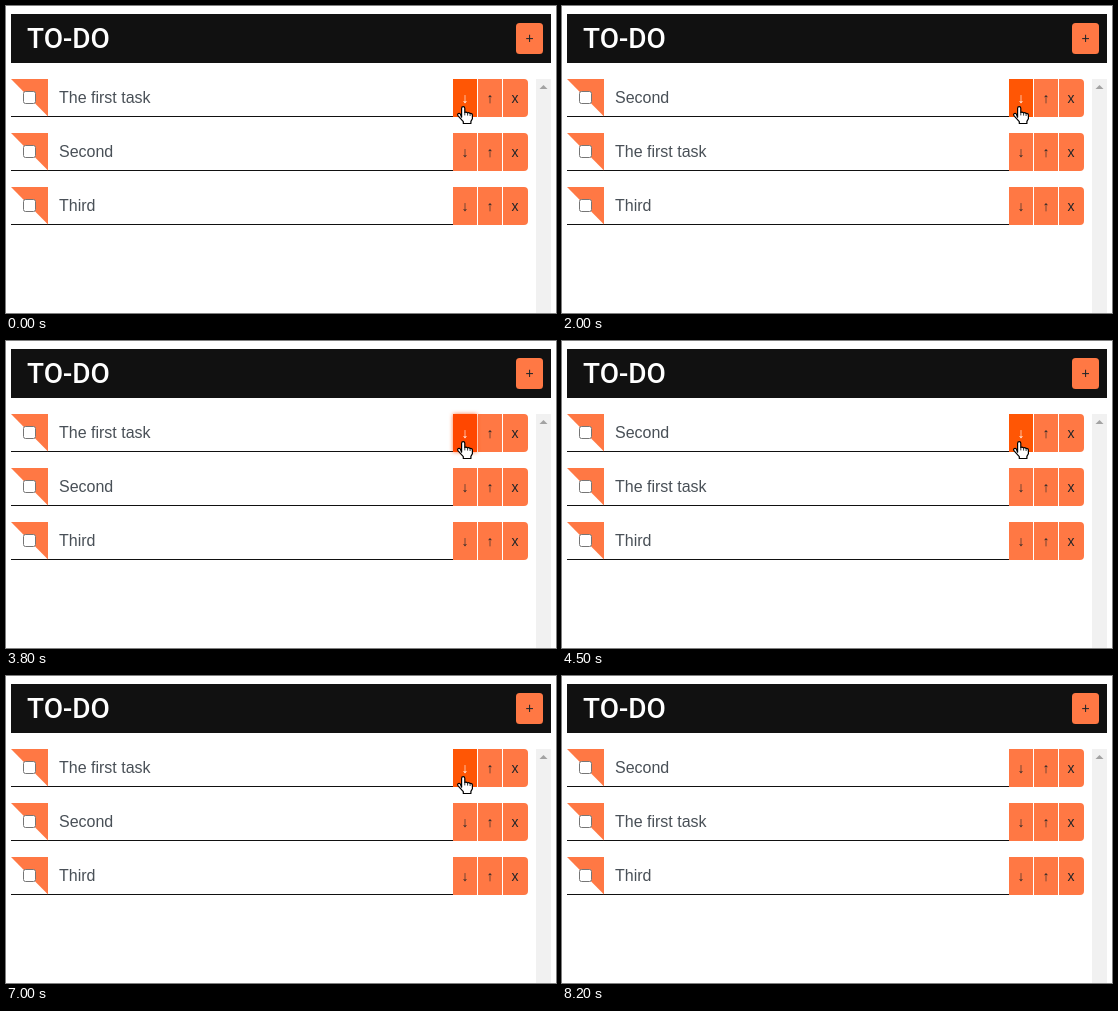
Write an HTML page that moves like this. It is 550 px wide and 307 px high and loops after 9100 ms.

```html
<!DOCTYPE html>
<html lang="en">
<head>
<meta charset="utf-8">
<title>To-do list</title>
<style>
  html, body { margin: 0; width: 100%; height: 100%; overflow: hidden; background: #fff; }
  svg { display: block; width: 550px; height: 307px; font: 14px "Liberation Sans", Arial, sans-serif; }
  .title { font: 500 28px Roboto, sans-serif; fill: #fff; }
  .task { font-size: 16px; fill: #495057; }
  .label { text-anchor: middle; fill: #212529; }
  .accent { fill: #ff7844; }
  .cursor { fill: #fff; stroke: #000; stroke-width: 1.2; stroke-linejoin: round; }
  .glow { filter: drop-shadow(0 0 2px rgba(255, 71, 0, .75)); }
</style>
</head>
<body>
<svg viewBox="0 0 550 307">
  <rect x="5" y="8" width="540" height="49" fill="#111"/>
  <text class="title" x="21" y="42">TO-DO</text>
  <rect class="accent" x="510" y="17" width="27" height="31" rx="3.5"/>
  <text class="label" x="523.5" y="37">+</text>
  <rect x="530" y="73" width="15" height="234" fill="#f1f1f1"/>
  <path d="M533.5 83h8l-4-4z" fill="#a3a3a3"/>
  <g id="rows"></g>
  <g id="hot">
    <rect id="hotButton" x="447" y="73" width="24" height="38"/>
    <text id="hotLabel" class="label" x="459" y="97">↓</text>
  </g>
  <g id="hand" class="cursor">
    <path d="M455.6 111.2V102.2q0-1.6 1.6-1.6t1.6 1.6v4.2q1.4-.9 2.7.4q1.5-.6 2.5.6
             q2.4-.3 2.4 2v3.4l-1.5 2.6v2.1h-7.6v-1.8l-5.4-6q-.8-1.4.4-2.2q1.2-.5 2 .5z"/>
    <path d="M458.8 106.4v3M461.6 107v2.6M464.1 107.6v2.4" fill="none" stroke-width=".8"/>
  </g>
  <path id="arrow" class="cursor" d="M455.5 101.7v16.2l3.7-3.5l2.5 5.9l2.7-1.1l-2.5-5.8h5.1z"/>
</svg>
<script>
const LOOP = 9100, STEP = 100;
const LEAVE = 8000;
// Each swap: button glows, rows return in the other order, hover colour is complete.
const swaps = [
  [700, 1300, 1400],
  [2100, 2700, 2900],
  [3800, 4400, 4500],
  [5500, 6100, 6100],
  [7100, 7600, 7800],
];
const NORMAL = [255, 120, 68], HOVER = [255, 86, 5], ACTIVE = [255, 71, 0];
const INK = [33, 37, 41], WHITE = [255, 255, 255];

const $ = id => document.getElementById(id);
const show = (element, on) => element.setAttribute('visibility', on ? 'visible' : 'hidden');
const mix = (a, b, k) => `rgb(${a.map((v, i) => Math.round(v + (b[i] - v) * k))})`;

const rowMarkup = (name, i) => `
  <g transform="translate(0 ${73 + i * 54})">
    <path d="M5 37h442v1H5z" fill="#111"/>
    <path class="accent" d="M5 0h37v37.5z"/>
    <rect x="17.5" y="12.5" width="12" height="12" rx="2" fill="#fff" stroke="#767676"/>
    <text class="task" x="53" y="24">${name}</text>
    <path class="accent" d="M447 0h24v38h-24zM472 0h24v38h-24zM497 0h21q4 0 4 4v30q0 4-4 4h-21z"/>
    <text class="label" x="459" y="24">↓</text>
    <text class="label" x="484" y="24">↑</text>
    <text class="label" x="509" y="24">x</text>
  </g>`;

$('rows').innerHTML = ['', '', 'Third'].map(rowMarkup).join('');
const rows = [...$('rows').children];
const names = ['The first task', 'Second'];

function draw(now) {
  const t = Math.floor(now % LOOP / STEP) * STEP;
  const done = swaps.filter(([, back]) => t >= back);
  const pressed = swaps.some(([press]) => t >= press && t < press + STEP);
  const hidden = swaps.some(([press, back]) => t >= press + STEP && t < back);

  let hover = 1;
  if (done.length) {
    const [, back, warm] = done[done.length - 1];
    hover = Math.min(1, (t - back + STEP) / (warm - back + STEP));
  }
  if (t >= LEAVE) hover = Math.max(0, 1 - (t - LEAVE + STEP) / 300);

  for (const i of [0, 1]) {
    rows[i].querySelector('.task').textContent = names[(i + done.length) % 2];
    show(rows[i], !hidden);
  }
  show($('hot'), !hidden);
  $('hotButton').setAttribute('class', pressed ? 'glow' : '');
  $('hotButton').style.fill = mix(NORMAL, pressed ? ACTIVE : HOVER, hover);
  $('hotLabel').style.fill = mix(INK, WHITE, hover);
  show($('hand'), !hidden && t < LEAVE);
  show($('arrow'), hidden);
}

const start = performance.now();
function tick() {
  draw(performance.now() - start);
  requestAnimationFrame(tick);
}
tick();
</script>
</body>
</html>
```
